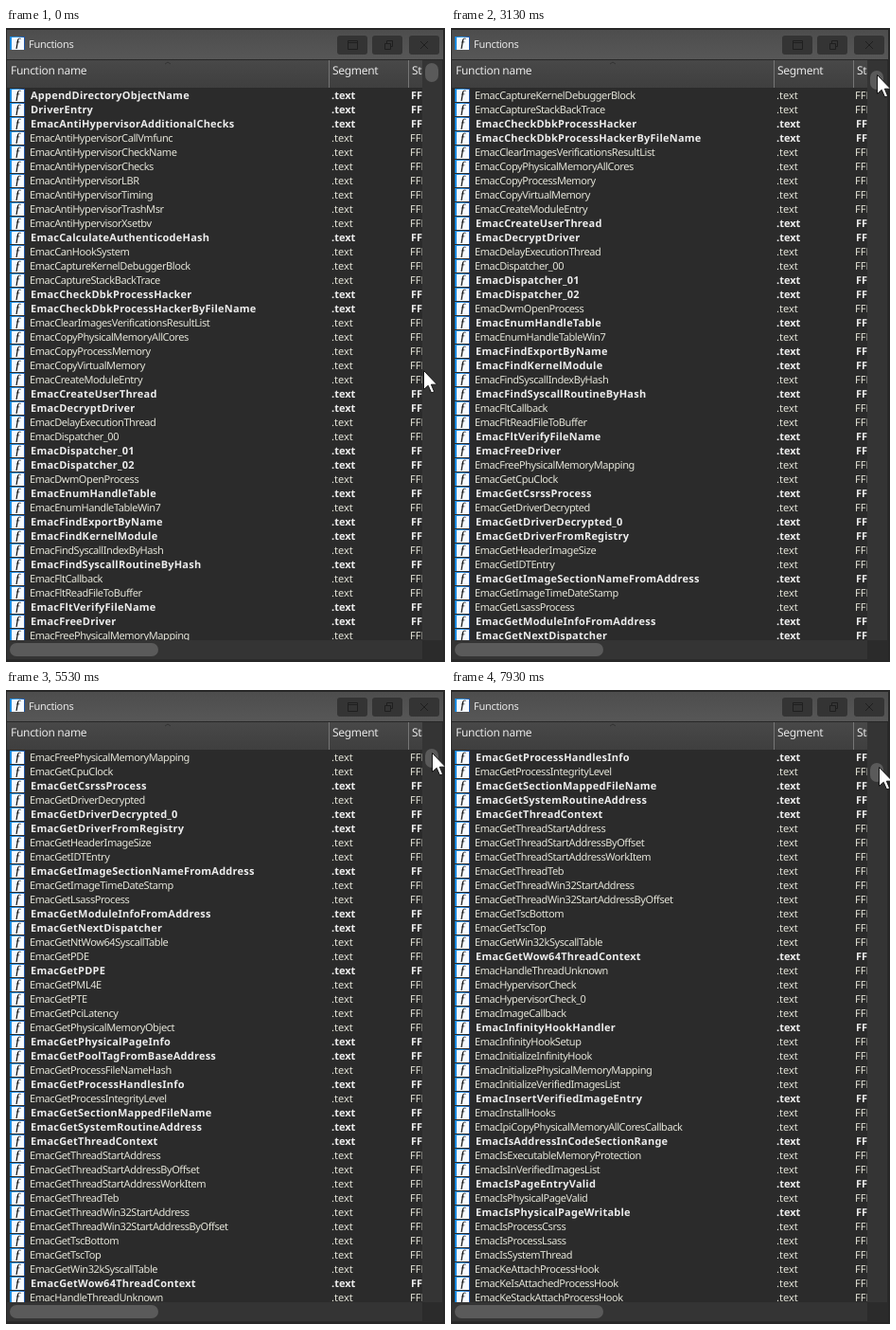
Animation of 464x669 px, one loop 8 s. Source, as an HTML page with a canvas:

```html
<!DOCTYPE html>
<html lang="en">
<head>
<meta charset="utf-8">
<title>Functions</title>
<style>
html, body { margin: 0; width: 100%; height: 100%; overflow: hidden; background: #2d2d2d; }
canvas { display: block; }
</style>
</head>
<body>
<canvas id="stage" width="464" height="669"></canvas>
<script>
const ctx = document.getElementById('stage').getContext('2d');
const LOOP = 8000, TICK = 200 / 3, ROW = 15, LIST_TOP = 64, LIST_BOTTOM = 646;
const ROWS_PER_PIXEL = 1.525;

// "*" marks a bold row; every name after the first two starts with "Emac".
const rows = `*AppendDirectoryObjectName *DriverEntry *AntiHypervisorAdditionalChecks
AntiHypervisorCallVmfunc AntiHypervisorCheckName AntiHypervisorChecks AntiHypervisorLBR
AntiHypervisorTiming AntiHypervisorTrashMsr AntiHypervisorXsetbv *CalculateAuthenticodeHash
CanHookSystem CaptureKernelDebuggerBlock CaptureStackBackTrace *CheckDbkProcessHacker
*CheckDbkProcessHackerByFileName ClearImagesVerificationsResultList CopyPhysicalMemoryAllCores
CopyProcessMemory CopyVirtualMemory CreateModuleEntry *CreateUserThread *DecryptDriver
DelayExecutionThread Dispatcher_00 *Dispatcher_01 *Dispatcher_02 DwmOpenProcess
*EnumHandleTable EnumHandleTableWin7 *FindExportByName *FindKernelModule
FindSyscallIndexByHash *FindSyscallRoutineByHash FltCallback FltReadFileToBuffer
*FltVerifyFileName *FreeDriver FreePhysicalMemoryMapping GetCpuClock *GetCsrssProcess
GetDriverDecrypted *GetDriverDecrypted_0 *GetDriverFromRegistry GetHeaderImageSize GetIDTEntry
*GetImageSectionNameFromAddress GetImageTimeDateStamp GetLsassProcess *GetModuleInfoFromAddress
*GetNextDispatcher GetNtWow64SyscallTable GetPDE *GetPDPE GetPML4E GetPTE GetPciLatency
GetPhysicalMemoryObject *GetPhysicalPageInfo *GetPoolTagFromBaseAddress GetProcessFileNameHash
*GetProcessHandlesInfo GetProcessIntegrityLevel *GetSectionMappedFileName
*GetSystemRoutineAddress *GetThreadContext GetThreadStartAddress GetThreadStartAddressByOffset
GetThreadStartAddressWorkItem GetThreadTeb GetThreadWin32StartAddress
GetThreadWin32StartAddressByOffset GetTscBottom GetTscTop GetWin32kSyscallTable
*GetWow64ThreadContext HandleThreadUnknown HypervisorCheck HypervisorCheck_0 ImageCallback
*InfinityHookHandler InfinityHookSetup InitializeInfinityHook InitializePhysicalMemoryMapping
InitializeVerifiedImagesList *InsertVerifiedImageEntry InstallHooks
IpiCopyPhysicalMemoryAllCoresCallback *IsAddressInCodeSectionRange IsExecutableMemoryProtection
IsInVerifiedImagesList *IsPageEntryValid IsPhysicalPageValid *IsPhysicalPageWritable
IsProcessCsrss IsProcessLsass IsSystemThread KeAttachProcessHook KeIsAttachedProcessHook
KeStackAttachProcessHook`.split(/\s+/).map((entry, i) => ({
  bold: entry[0] === '*',
  name: (i < 2 ? '' : 'Emac') + entry.replace('*', '')
}));

// Times at which the dragged thumb moves down by one pixel.
const dragTimes = [2070, 2130, 2200, 2270, 2530, 2600, 3070, 3130, 3330, 3470, 3600, 3730, 3800,
  3930, 4070, 4130, 4270, 4470, 4530, 4670, 4870, 5000, 5130, 5400, 5530, 6000, 6270, 6470, 6530,
  6600, 6670, 6730, 6800, 7130, 7330, 7400, 7470, 7670, 7870, 7930];

// Pointer path before the drag: [tick, x, y].
const path = [[0, 442, 361], [2, 422, 323], [5, 422, 323], [8, 330, 500], [10, 225, 549],
  [12, 145, 440], [14, 180, 250], [16, 310, 90], [18, 432, 47], [19, 438, 53], [21, 448, 48],
  [23, 451, 43], [24, 451, 41]];

function pointerAt(t, drag) {
  const tick = Math.floor((t + 4) / TICK);
  const next = path.findIndex(p => p[0] > tick);
  if (next < 0) {
    const x = t < 3870 ? 451 : t < 4930 ? 450 : t < 7000 ? 451 : t < 7670 ? 452 : 453;
    return [x, 41 + drag];
  }
  const [a, b] = [path[next - 1], path[next]];
  const k = (tick - a[0]) / (b[0] - a[0]);
  return [1, 2].map(i => Math.round(a[i] + (b[i] - a[i]) * k));
}

function box(x, y, w, h, fill, radius = 0) {
  ctx.fillStyle = fill;
  ctx.beginPath();
  ctx.roundRect(x, y, w, h, radius);
  ctx.fill();
}

function text(str, x, y, { size = 11, bold = false, spacing = 0, color = '#e6e6e6' } = {}) {
  ctx.font = `${bold ? 'bold ' : ''}${size}px "Noto Sans", "Open Sans", sans-serif`;
  ctx.letterSpacing = spacing + 'px';
  ctx.fillStyle = color;
  ctx.fillText(str, x, y);
}

function gradient(x0, y0, x1, y1, ...colors) {
  const g = ctx.createLinearGradient(x0, y0, x1, y1);
  colors.forEach((c, i) => g.addColorStop(i / (colors.length - 1), c));
  return g;
}

function functionIcon(x, y) {
  box(x, y, 16, 14, gradient(x, y, x + 16, y, '#1689e0', '#3c9ce8', '#1c4fa0'));
  box(x + 2, y + 1, 13, 13, '#f6faff');
  ctx.font = 'italic 14px "Liberation Serif", "Noto Serif", serif';
  ctx.letterSpacing = '0px';
  ctx.fillStyle = '#000';
  ctx.fillText('ƒ', x + 5, y + 11);
}

function strokePath(d, color) {
  ctx.strokeStyle = color;
  ctx.lineWidth = 1;
  ctx.stroke(new Path2D(d));
}

function drawTitleBar() {
  box(1, 2, 461, 31, gradient(0, 2, 0, 33, '#4d4d4d', '#575757'));
  functionIcon(4, 9);
  text('Functions', 24, 21, { spacing: -0.3 });
  for (const x of [350, 387, 426]) box(x, 8, 32, 20, '#343434', 3);
  strokePath('M361.5 13.5h10v9h-10zM361 15.5h11', '#1f1f1f');
  strokePath('M400.5 16.5h6v6h-6zM402.5 16v-2.5h6v6h-2', '#1f1f1f');
  strokePath('M438 14l8 8M446 14l-8 8', '#1f1f1f');
}

function drawHeader() {
  box(1, 34, 439, 29, gradient(0, 34, 0, 63, '#484848', '#3f3f3f'));
  box(341, 34, 1, 29, '#767676');
  box(425, 34, 1, 29, '#767676');
  strokePath('M168 38l3-2l3 2', '#333');
  const style = { size: 12, spacing: -0.3 };
  text('Function name', 5, 49, style);
  text('Segment', 345, 49, style);
  ctx.save();
  ctx.beginPath();
  ctx.rect(426, 34, 14, 29);
  ctx.clip();
  text('Start', 429, 49, style);
  ctx.restore();
}

function drawList(first) {
  ctx.save();
  ctx.beginPath();
  ctx.rect(1, LIST_TOP, 439, LIST_BOTTOM - LIST_TOP);
  ctx.clip();
  for (let i = 0; i < 39; i++) {
    const { bold, name } = rows[first + i];
    const top = LIST_TOP + i * ROW, base = top + 11, shift = bold ? 1 : 0;
    const color = bold ? '#ececec' : '#e4e4d8';
    functionIcon(4, top);
    text(name, 25 + shift, base, { bold, color, spacing: bold ? 0.22 : -0.42 });
    text('.text', 344, base, { bold, color });
    text('FFFFF', 427 + shift, base, { bold, color });
  }
  ctx.restore();
}

function drawPointer(x, y) {
  ctx.save();
  ctx.translate(x - 1, y);
  const arrow = new Path2D('M.5.5V20.5L5.2 16.3L8.6 24L11.6 22.7L8.4 15.2H14.6Z');
  ctx.fillStyle = '#fff';
  ctx.fill(arrow);
  ctx.strokeStyle = '#151515';
  ctx.lineWidth = 1;
  ctx.stroke(arrow);
  ctx.restore();
}

function draw(t) {
  const drag = dragTimes.filter(time => time <= t).length;
  ctx.textRendering = 'geometricPrecision';
  box(0, 0, 464, 669, '#272727');
  box(1, 34, 461, 633, '#2b2b2b');
  drawTitleBar();
  drawHeader();
  drawList(Math.round(drag * ROWS_PER_PIXEL));
  box(440, 34, 21, 612, '#343434');
  box(1, LIST_BOTTOM, 439, 20, '#343434');
  box(443, 37 + drag, 14, 20, '#5a5a5a', 7);
  box(4, 649, 157, 14, '#5a5a5a', 7);
  drawPointer(...pointerAt(t, drag));
}

function loop() {
  draw(performance.now() % LOOP);
  requestAnimationFrame(loop);
}
loop();
</script>
</body>
</html>
```
